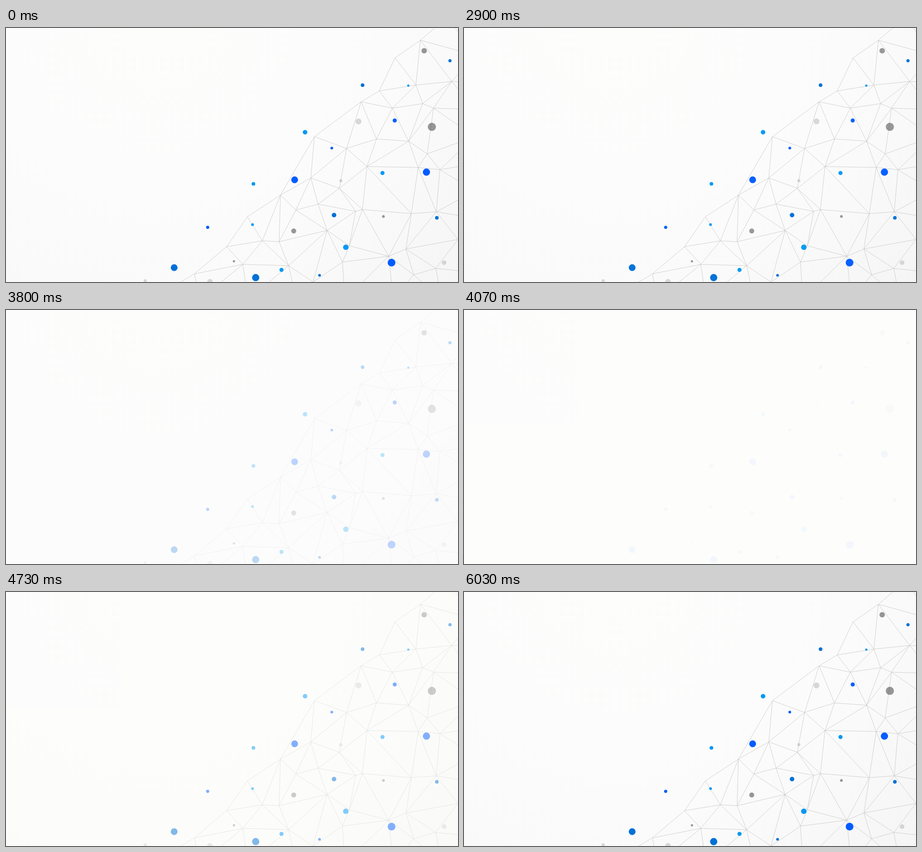
Animation, 998 px wide and 561 px high, one loop 8130 ms. Source, as an HTML page:

```html
<!DOCTYPE html>
<html lang="en">
<head>
<meta charset="utf-8">
<title>Network backdrop</title>
<style>
  html, body { margin: 0; width: 100%; height: 100%; overflow: hidden; background: #fdfdfc; }
  svg { display: block; width: 100vw; height: 100vh; }
  #scene { animation: fade 8130ms linear infinite; }
  /* 2870 ms, 4120 ms, 5370 ms */
  @keyframes fade {
    0%, 35.301% { opacity: 1; }
    50.677% { opacity: 0; }
    66.052%, 100% { opacity: 1; }
  }
  #mesh { fill: none; stroke: #c5c5c3; stroke-width: .8; }
</style>
</head>
<body>
<svg viewBox="0 0 998 561" preserveAspectRatio="none">
  <defs>
    <radialGradient id="shade" gradientUnits="userSpaceOnUse" cx="334" cy="-41" r="900">
      <stop offset="0" stop-color="#fdfdfc"/>
      <stop offset=".45" stop-color="#fcfcfc"/>
      <stop offset=".7" stop-color="#fafafa"/>
      <stop offset="1" stop-color="#f5f5f5"/>
    </radialGradient>
  </defs>
  <g id="scene">
    <rect width="998" height="561" fill="url(#shade)"/>
    <path id="mesh"/>
    <g id="dots"></g>
  </g>
</svg>
<script>
  const parse = list => list.trim().split(/\s+/).map(p => p.split(',').map(Number));
  const row = (count, place) => Array.from({ length: count }, (_, i) => place(i));

  // Visible joints, then evenly spaced ones past the right and bottom edges
  const joints = [
    ...parse(`975,-24 915,27 859,66 905,126 984,118 824,139 784,163 853,177 920,167
      944,177 681,240 752,266 818,245 889,250 930,278 797,306 910,308 958,313 673,331
      736,354 606,369 640,402 689,389 772,405 787,401 895,410 950,406 533,417 566,470
      603,472 709,447 758,481 845,504 883,488 998,467 487,483 416,543 523,522 624,525
      743,517 678,561 900,545 949,531`),
    ...row(9, i => [1035, 60 + 60 * i]),
    ...row(7, i => [320 + 107 * i, 600])
  ];

  function circumcircle([ax, ay], [bx, by], [cx, cy]) {
    bx -= ax; by -= ay; cx -= ax; cy -= ay;
    const d = 2 * (bx * cy - by * cx), b = bx * bx + by * by, c = cx * cx + cy * cy;
    const x = (cy * b - by * c) / d, y = (bx * c - cx * b) / d;
    return { x: ax + x, y: ay + y, r: Math.hypot(x, y) };
  }

  // Delaunay mesh; the radius limit keeps its outer rim ragged
  function meshEdges(points, maxRadius) {
    const edges = new Set();
    const n = points.length;
    for (let i = 0; i < n; i++)
      for (let j = i + 1; j < n; j++)
        for (let k = j + 1; k < n; k++) {
          const { x, y, r } = circumcircle(points[i], points[j], points[k]);
          if (!(r < maxRadius)) continue;
          if (points.some(([px, py]) => Math.hypot(px - x, py - y) < r - 1e-6)) continue;
          for (const [a, b] of [[i, j], [j, k], [i, k]])
            edges.add(`M${points[a]}L${points[b]}`);
        }
    return [...edges];
  }
  document.getElementById('mesh').setAttribute('d', meshEdges(joints, 105).join(''));

  // x,y,radius by colour
  const dots = {
    '#005cff': '858,204,4.5 719,265,3 637,335,7.5 928,318,8 445,440,3.5 851,518,8.5',
    '#0070d6': '980,72,3.5 787,126,4 724,413,5 951,419,4 371,529,7.5 551,551,8 692,546,3',
    '#0098f4': '888,127,2.5 660,230,5 546,344,4 831,320,4.5 544,434,3 750,484,6 608,534,4.5',
    'rgba(60,60,62,.53)': '923,50,6 940,218,9 833,416,3 635,448,5.5 503,515,2.5',
    'rgba(150,150,145,.35)': '778,206,6.5 739,337,3.5 967,518,5 307,558,3.5 450,560,6'
  };
  document.getElementById('dots').innerHTML = Object.entries(dots).map(([fill, list]) =>
    `<g fill="${fill}">` + parse(list).map(([x, y, r]) =>
      `<circle cx="${x + .3}" cy="${y + .3}" r="${r}"/>`).join('') + '</g>').join('');
</script>
</body>
</html>
```
